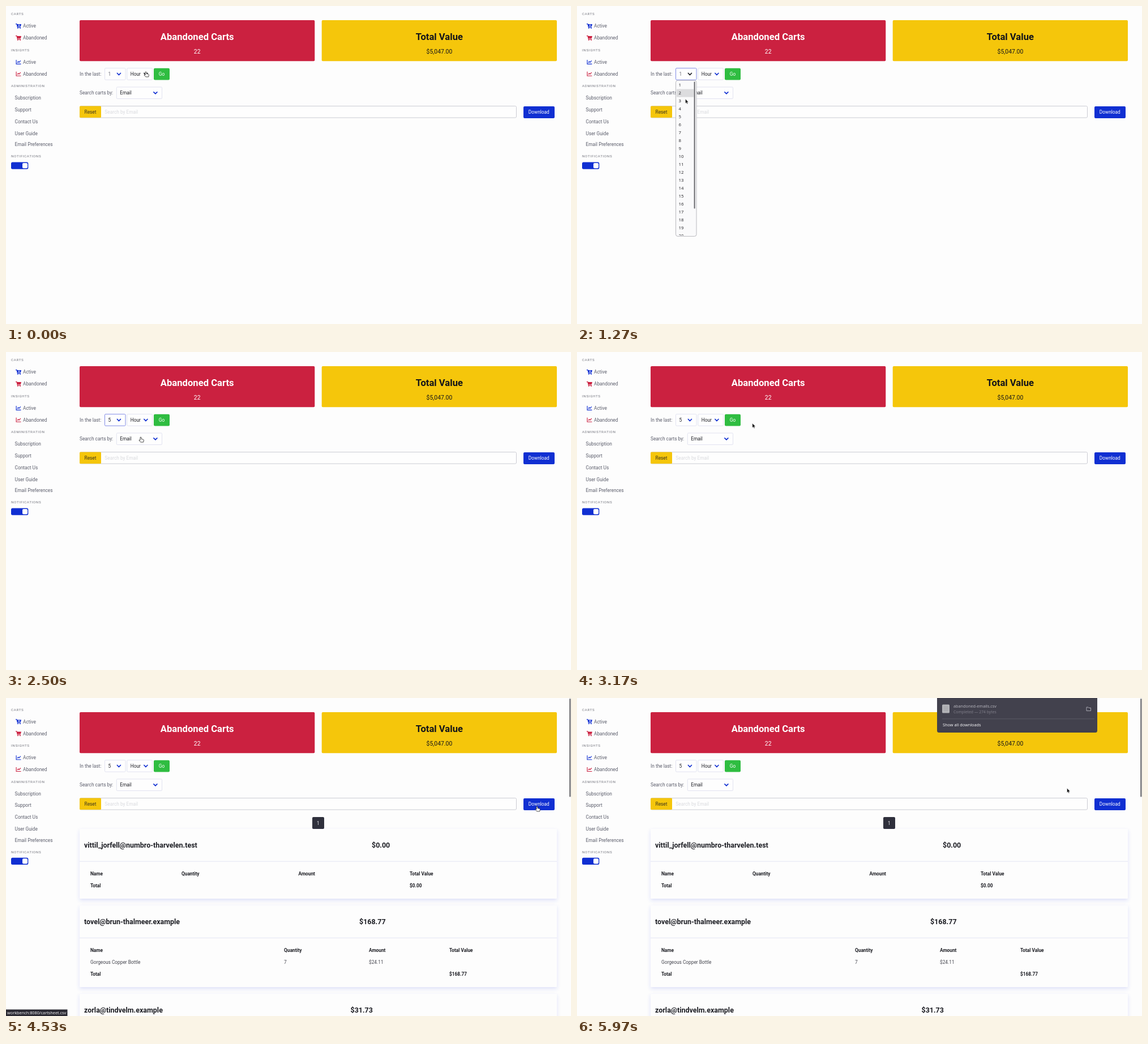
An HTML page that plays this animation: 998x561 px, repeating every 6.01 s.

```html
<!DOCTYPE html>
<html lang="en">
<head>
<meta charset="utf-8">
<title>Abandoned carts</title>
<style>
  html, body { margin: 0; width: 100%; height: 100%; overflow: hidden; background: #fdfdfd; }
  svg { display: block; width: 100%; height: 100%; font-family: Roboto, sans-serif; }
  .ui { font-family: "Noto Sans", sans-serif; }
</style>
</head>
<body>
<svg id="stage" viewBox="0 0 998 561">
  <defs>
    <filter id="shadow" x="-5%" y="-10%" width="110%" height="130%">
      <feDropShadow dx="0" dy="3" stdDeviation="3" flood-color="#4450e0" flood-opacity=".16"/>
    </filter>
    <clipPath id="listClip"><rect x="175" y="132" width="36" height="273"/></clipPath>
  </defs>
</svg>
<script>
const LOOP = 6010;
const BLUE = '#102fd2', RED = '#cb2140', YELLOW = '#f5c60b', INK = '#1d1e24', GREY = '#5b5d6b';
const BASE = 8.32;
const stage = document.getElementById('stage');

function add(parent, tag, attrs = {}, content) {
  const el = document.createElementNS('http://www.w3.org/2000/svg', tag);
  for (const key in attrs) el.setAttribute(key, attrs[key]);
  if (content !== undefined) el.textContent = content;
  parent.appendChild(el);
  return el;
}
const group = (parent = stage, attrs) => add(parent, 'g', attrs);
const rect = (parent, x, y, width, height, fill, extra) =>
  add(parent, 'rect', { x, y, width, height, fill, ...extra });
const path = (parent, d, stroke, width, extra) =>
  add(parent, 'path', { d, stroke, 'stroke-width': width, fill: 'none', ...extra });
// cy is the middle of the capital letters
const text = (parent, x, cy, str, size = BASE, fill = INK, extra) =>
  add(parent, 'text', { x, y: cy + size * 0.355, 'font-size': size, fill, ...extra }, str);
const show = (el, on) => el.setAttribute('display', on ? 'inline' : 'none');

const bold = { 'font-weight': 700 };
const middle = { 'text-anchor': 'middle' };

// Sidebar
const sidebar = group();
const cartIcon = (y, color, plus) => {
  const g = group(sidebar, { transform: `translate(17 ${y - 4.6})` });
  path(g, 'M0 .7H2L3.4 6.6H8.8', color, 1.1);
  path(g, 'M2 1.2H10L8.9 5.3H3Z', 'none', 0, { fill: color });
  for (const cx of [4, 8]) add(g, 'circle', { cx, cy: 8.1, r: 1, fill: color });
  if (plus) path(g, 'M6 1.7V4.7M4.5 3.2H7.5', '#fff', 0.8);
};
const chartIcon = (y, color) => {
  const g = group(sidebar, { transform: `translate(17.5 ${y - 4})` });
  path(g, 'M.6 0V7.4H9', color, 1.1);
  path(g, 'M2.3 5L4.2 3L5.6 4.3L8.3 1.4', color, 1.2);
};
[['CARTS', 14], ['INSIGHTS', 77.5], ['ADMINISTRATION', 141], ['NOTIFICATIONS', 265]].forEach(([label, y]) =>
  text(sidebar, 9, y, label, 6.24, '#73747d', { 'letter-spacing': 0.65 }));
[['Active', 35.5], ['Abandoned', 56.5], ['Active', 99], ['Abandoned', 119.8]].forEach(([label, y], i) => {
  const color = i % 2 ? RED : BLUE;
  if (i < 2) cartIcon(y, color, i === 0); else chartIcon(y, color);
  text(sidebar, 30, y, label, BASE, GREY);
});
[['Subscription', 162.3], ['Support', 183.2], ['Contact Us', 204], ['User Guide', 224.7], ['Email Preferences', 244.3]]
  .forEach(([label, y]) => text(sidebar, 15.5, y, label, BASE, GREY));
rect(sidebar, 9, 275.5, 30.3, 12.3, BLUE, { rx: 2.5 });
rect(sidebar, 29, 277, 9, 9.3, '#fff', { rx: 2 });

// Summary boxes
const summary = (x, color, ink, title, value) => {
  rect(stage, x, 25, 415.3, 72.3, color, { rx: 2 });
  text(stage, x + 207.7, 54, title, 16.64, ink, { ...bold, ...middle });
  text(stage, x + 207.7, 80, value, 10.4, ink, middle);
};
summary(130, RED, '#fff', 'Abandoned Carts', '22');
summary(557.7, YELLOW, '#14151a', 'Total Value', '$5,047.00');

// Filters
const chevron = (x, y) => path(stage, `M${x - 3} ${y - 1.6}l3 3l3 -3`, BLUE, 1.7, { 'stroke-linecap': 'round' });
const select = (x, y, w, label) => {
  const box = rect(stage, x, y, w, 20.5, '#fefefe', { rx: 1.5, stroke: '#e2e3f1' });
  return { box, label: text(stage, x + 6, y + 10.5, label), arrow: chevron(x + w - 11.6, y + 10.4) };
};
text(stage, 130, 120, 'In the last:', BASE, GREY);
const amount = select(174.5, 109.7, 36.5, '1');
const unit = select(213.8, 109.7, 44.7, 'Hour');
rect(stage, 261, 109.8, 28, 20.7, '#2fbd41', { rx: 2 });
text(stage, 275, 120.2, 'Go', BASE, '#fff', middle);
text(stage, 130, 153.3, 'Search carts by:', BASE, GREY);
select(195.3, 143, 80.2, 'Email');

rect(stage, 130.5, 176.6, 771, 20.4, '#fefefe', { rx: 2, stroke: '#cbccd3' });
rect(stage, 130, 176.4, 38, 20.6, YELLOW, { rx: 1.5 });
text(stage, 149, 186.8, 'Reset', BASE, '#3b3420', middle);
text(stage, 174.3, 186.8, 'Search by Email', BASE, '#d9dade');
rect(stage, 914, 177, 55, 21, BLUE, { rx: 2 });
text(stage, 941.3, 187.4, 'Download', BASE, '#fff', middle);

// Results
const results = group();
rect(results, 541, 210, 21, 21, '#2f303c', { rx: 2 });
text(results, 551.3, 220.6, '1', BASE, '#e6e6ea', middle);
const card = (y, height, email, price, priceX, columns, rows) => {
  rect(results, 130, y, 843, height, '#fdfdfd', { rx: 1.5, filter: 'url(#shadow)' });
  path(results, `M130 ${y + 57.2}H973`, '#e3e4f4', 1);
  const head = { 'font-weight': 600 };
  text(results, 138, y + 28.2, email, 12.48, INK, head);
  text(results, priceX, y + 28.2, price, 12.48, INK, head);
  rows.forEach((row, r) => row.forEach((cell, c) => {
    const plain = r > 0 && r < rows.length - 1;
    text(results, columns[c], y + 79 + r * 20.8, cell, BASE, plain ? '#44454e' : INK, plain ? {} : bold);
  }));
};
const header = ['Name', 'Quantity', 'Amount', 'Total Value'];
card(231, 123, 'vittil_jorfell@numbro-tharvelen.test', '$0.00', 646, [149, 310, 516.5, 713],
  [header, ['Total', '', '', '$0.00']]);
card(366, 144, 'tovel@brun-thalmeer.example', '$168.77', 624, [149, 491, 641, 783],
  [header, ['Gorgeous Copper Bottle', '7', '$24.11'], ['Total', '', '', '$168.77']]);
card(522, 144, 'zorla@tindvelm.example', '$31.73', 608.5, [], []);
rect(results, 995.3, 1, 2, 173.5, '#5c5c60', { rx: 1 });

// Number list
const list = group(stage, { class: 'ui' });
rect(list, 174.5, 131.3, 36.5, 275, '#fafafb', { rx: 3.5, stroke: '#b9b9be' });
const highlight = rect(list, 176, 0, 30.5, 14, '#dcdcde');
const items = group(list, { 'clip-path': 'url(#listClip)' });
for (let n = 1; n <= 20; n++) text(items, 179.5, 125.6 + n * 14, n, 7.8, '#2c2c30');
rect(list, 206.6, 133.5, 2, 224, '#6b6b70', { rx: 1 });

// Link address and download panel
const status = group(stage, { class: 'ui' });
rect(status, 0, 549.5, 108.5, 11.5, '#2b2a33');
text(status, 2, 555.3, 'workbench:8080/cartsheet.csv', 7.3, '#f0f0f2');

const panel = group(stage, { class: 'ui' });
rect(panel, 636, -6, 283, 67, '#42414d', { rx: 3.5 });
rect(panel, 645, 11.5, 13, 15, '#b3b3b7', { rx: 1.5 });
path(panel, 'M647.5 16H655.5M647.5 19H655.5M647.5 22H655.5', '#97979d', 0.8);
text(panel, 665, 14.2, 'abandoned-emails.csv', 7.25, '#b4b3bb');
text(panel, 665, 24.7, 'Completed — 274 bytes', 6.8, '#807f8a');
path(panel, 'M645 36.8H914', '#5b5a66', 1);
path(panel, 'M900 16.2H903L904 17.4H907.5V22.6H900Z', '#b4b3bb', 0.9);
text(panel, 646, 47.3, 'Show all downloads', 7.3, '#f3f3f5');

// Pointer
const pointer = group();
const arrow = path(pointer, 'M0 0V8L1.8 6.4L3 9L4.3 8.4L3.2 5.9H5.6Z', '#fff', 0.5, { fill: '#111' });
const hand = path(pointer, 'M-1 .6Q0 -.6 1 .6V3.4L4.4 4.2Q5.6 4.5 5.4 5.8L4.7 9H-.2L-3 5.8Q-3 4.4 -1 5.6Z',
  '#222', 0.8, { fill: '#fff', 'stroke-linejoin': 'round' });

const OPEN = 740, PICK = 2020, GO = 2950, LOADED = 3260, PANEL = 5110;
// Each move: start, end, x, y
const moves = [
  [90, 600, 195, 118], [1000, 1480, 189, 195], [2140, 2795, 274, 117], [3080, 3640, 780, 240],
  [3860, 4250, 938, 191], [4700, 5050, 943, 186], [5400, 5900, 865.5, 159]
];
const clamp = v => Math.min(1, Math.max(0, v));
const smooth = v => v * v * (3 - 2 * v);
function pointerAt(t) {
  let x = 247, y = 116;
  for (const [start, end, toX, toY] of moves) {
    const k = smooth(clamp((t - start) / (end - start)));
    x += (toX - x) * k;
    y += (toY - y) * k;
  }
  return { x, y };
}
const over = (p, x, y, w, h) => p.x >= x && p.x <= x + w && p.y >= y && p.y <= y + h;

function render(t) {
  const p = pointerAt(t);
  const open = t >= OPEN && t < PICK;
  const picked = t >= PICK;
  const loaded = t >= LOADED;
  const onDownload = over(p, 914, 177, 55, 21);
  const clickable = onDownload || over(p, 174, 109, 115, 22) || over(p, 195, 143, 81, 21);

  sidebar.setAttribute('transform', `translate(0 ${loaded ? 6.3 : 0})`);
  show(results, loaded);
  show(status, onDownload);

  amount.label.textContent = picked ? '5' : '1';
  amount.label.setAttribute('fill', picked ? INK : '#6a6b75');
  amount.arrow.setAttribute('stroke', open ? INK : BLUE);
  amount.box.setAttribute('stroke', t >= OPEN && t < GO ? '#828ce6' : '#e2e3f1');
  unit.arrow.setAttribute('stroke', t < 250 ? INK : BLUE);

  show(list, open);
  const row = Math.max(0, Math.floor((pointerAt(t - 60).y - 132.5) / 14));
  highlight.setAttribute('y', 132.6 + row * 14);

  const reveal = clamp((t - PANEL) / 180);
  panel.setAttribute('opacity', reveal);
  panel.setAttribute('transform', `translate(0 ${-3 * (1 - reveal)})`);

  pointer.setAttribute('transform', `translate(${p.x} ${p.y})`);
  show(hand, clickable && !open);
  show(arrow, !clickable || open);
}

const began = performance.now();
function tick() {
  render((performance.now() - began) % LOOP);
  requestAnimationFrame(tick);
}
tick();
</script>
</body>
</html>
```
